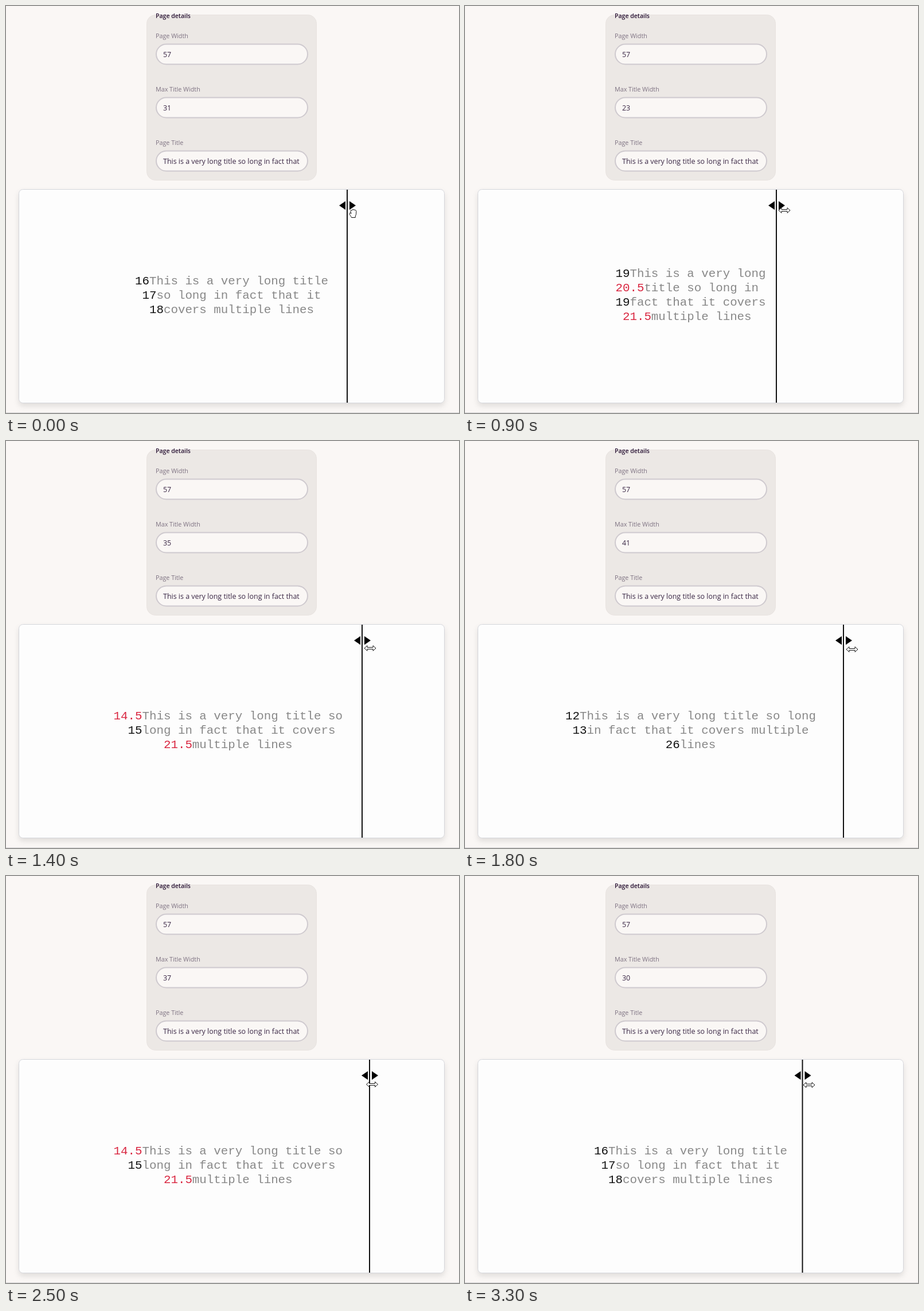
Animation of 790x709 px, one loop 3.4 s. Source, as an HTML page:

```html
<!DOCTYPE html>
<html lang="en">
<head>
<meta charset="utf-8">
<title>Title width</title>
<style>
  html, body { margin: 0; width: 100%; height: 100%; overflow: hidden; background: #faf7f5; }
  svg { display: block; width: 790px; height: 709px; }
  .ui { font-family: "Open Sans", "Noto Sans", sans-serif; }
  .legend { font-size: 10.5px; font-weight: 600; fill: #291334; }
  .label { font-size: 10.75px; fill: #7e7282; }
  .value { font-size: 12.45px; fill: #3a2745; }
  .field { fill: #faf7f5; stroke: #cfcacf; stroke-width: 2; }
  .paper { fill: #fdfdfd; stroke: #d5d6db; filter: drop-shadow(0 5px 5px rgba(0, 0, 0, .1)); }
  #rows { font: 20.8px "Liberation Mono", "Noto Sans Mono", monospace; fill: #888; }
  .whole { fill: #111; }
  .half { fill: #d92640; }
  .cursor { fill: #fff; stroke: #111; stroke-width: 1; stroke-linejoin: round; }
</style>
</head>
<body>
<svg viewBox="0 0 790 709">
  <rect width="790" height="709" fill="#faf7f5"/>
  <rect y="708" width="790" height="1" fill="#d6d4d7"/>
  <g class="ui">
    <rect x="245.5" y="15.5" width="296" height="288" rx="15" fill="#ece8e5" stroke="#e8e3e0"/>
    <text class="legend" x="261" y="20.5">Page details</text>
    <g id="fields"></g>
  </g>
  <rect class="paper" x="22.5" y="319.5" width="742" height="372" rx="7"/>
  <g id="rows"></g>
  <g id="guide">
    <path d="M-1 320h2v371h-2z" fill="#111"/>
    <path d="M-14 347.5L-3 340v15zM15 347.5L4 340v15z"/>
  </g>
  <path id="resize" class="cursor" d="M-10 0l5-4.5v3h10v-3l5 4.5l-5 4.5v-3h-10v3z"/>
  <path id="hand" class="cursor" d="M-3 7.5C-4 4.5-7 2-6.5 .2C-6-1.2-4.5-.6-3.6 .8L-4.7-3.6C-5-5.4-3-6-2.5-4.4L-2-5.6C-1.7-7.3 .3-7.2 .4-5.6C.9-7 2.8-6.6 2.9-5C3.6-6 5.4-5.4 5.3-3.6C5.3 0 5.2 3 3.7 5V7.5z"/>
</svg>
<script>
const TITLE = "This is a very long title so long in fact that it covers multiple lines";
const PAGE_WIDTH = 57;
const LOOP = 3400, STEP = 100;
const CHAR = 12.48, LEFT = 50.3, LEADING = 25;
const CENTER = 393.5, UNIT = 6.5;

// Title width at each step of the drag.
const WIDTHS = [
  31, 30, 27, 24, 21, 20, 19, 19, 21, 23, 26, 29,
  31, 33, 35, 37, 39, 40, 41, 42, 43, 44, 43, 42,
  40, 37, 36, 35, 35, 34, 33, 32, 31, 30
];

// Pointer relative to the guide: step, horizontal offset, y.
const POINTER = [
  [0, 10.5, 361], [4, 4, 353], [6, 6, 354], [9, 14, 356], [14, 14, 361],
  [18, 15, 363], [21, 5, 363], [25, 4.5, 363], [31, 5, 364], [33, 11.5, 364]
];

const byId = id => document.getElementById(id);

function add(parent, tag, attrs, text = "") {
  const node = document.createElementNS("http://www.w3.org/2000/svg", tag);
  for (const key in attrs) node.setAttribute(key, attrs[key]);
  node.textContent = text;
  return parent.appendChild(node);
}

function addField(label, value, y) {
  const group = add(byId("fields"), "g", { transform: `translate(261 ${y})` });
  add(group, "text", { class: "label", y: 3.5 }, label);
  add(group, "rect", { class: "field", x: 1, y: 14.5, width: 264, height: 35, rx: 17.5 });
  return add(group, "text", { class: "value", x: 13, y: 37 }, value);
}

// Each space counts twice against the limit.
function wrap(limit) {
  const lines = [];
  let line = "";
  for (const word of TITLE.split(" ")) {
    const next = line ? line + " " + word : word;
    if (line && next.replaceAll(" ", "  ").length > limit) {
      lines.push(line);
      line = word;
    } else line = next;
  }
  return [...lines, line];
}

function drawTitle(width) {
  const rows = byId("rows");
  const lines = wrap(width);
  const top = 509.5 - LEADING / 2 * (lines.length - 1);
  rows.replaceChildren();
  lines.forEach((line, i) => {
    const pad = (PAGE_WIDTH - line.length) / 2;
    const column = Math.ceil(pad) - String(pad).length;
    const row = add(rows, "text", { x: LEFT + column * CHAR, y: top + i * LEADING });
    add(row, "tspan", { class: pad % 1 ? "half" : "whole" }, pad);
    add(row, "tspan", {}, line);
  });
}

function pointerAt(step) {
  const i = Math.max(1, POINTER.findIndex(key => key[0] >= step));
  const [from, dx0, y0] = POINTER[i - 1], [to, dx1, y1] = POINTER[i];
  const k = (step - from) / (to - from);
  return [dx0 + (dx1 - dx0) * k, y0 + (y1 - y0) * k];
}

addField("Page Width", PAGE_WIDTH, 52);
const widthValue = addField("Max Title Width", "", 145);
addField("Page Title", "This is a very long title so long in fact that", 238);

function draw(step) {
  const width = WIDTHS[step];
  const x = CENTER + width * UNIT;
  const [dx, y] = pointerAt(step);
  const grabbing = step > 0;
  widthValue.textContent = width;
  drawTitle(width);
  byId("guide").setAttribute("transform", `translate(${x})`);
  for (const id of ["resize", "hand"]) {
    byId(id).setAttribute("transform", `translate(${x + dx} ${y})`);
    byId(id).setAttribute("visibility", (id === "resize") === grabbing ? "visible" : "hidden");
  }
}

const start = performance.now();
let shown = 0;
draw(0);

function tick() {
  const step = Math.floor((performance.now() - start) % LOOP / STEP);
  if (step !== shown) draw(shown = step);
  requestAnimationFrame(tick);
}
requestAnimationFrame(tick);
</script>
</body>
</html>
```
